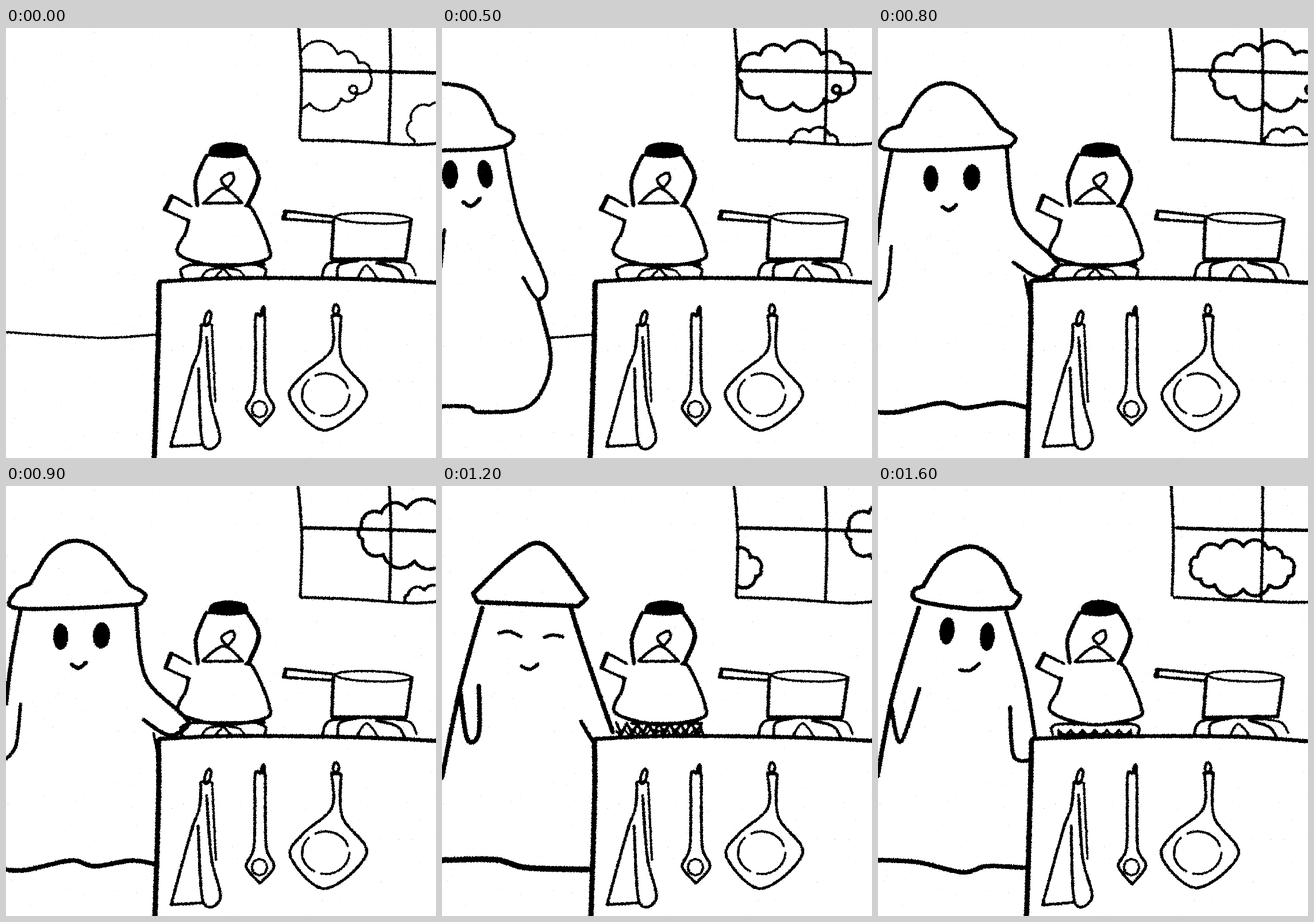
Animation, 748 px wide and 748 px high, one loop 1.7 s. Source, as an HTML page:

```html
<!DOCTYPE html>
<html lang="en">
<head>
<meta charset="utf-8">
<title>Kitchen ghost</title>
<style>
html, body { margin: 0; width: 100%; height: 100%; overflow: hidden; background: #fff; }
svg { display: block; width: 748px; height: 748px; overflow: hidden; }
#scene { stroke: #000; fill: none; stroke-linecap: round; stroke-linejoin: round; }
</style>
</head>
<body>
<svg viewBox="0 0 748 748">
  <defs>
    <filter id="crayon" filterUnits="userSpaceOnUse" x="-20" y="-20" width="788" height="788" color-interpolation-filters="sRGB">
      <feTurbulence type="fractalNoise" baseFrequency=".42" numOctaves="2" seed="4"/>
      <feColorMatrix values="0 0 0 1 0 0 0 0 1 0 0 0 0 1 0 0 0 0 0 1" result="grain"/>
      <feGaussianBlur in="SourceGraphic" stdDeviation="1.1"/>
      <feComposite in2="grain" operator="arithmetic" k2="1" k3="1.2" k4="-.6"/>
      <feComponentTransfer>
        <feFuncR type="linear" slope="5" intercept="-2"/>
        <feFuncG type="linear" slope="5" intercept="-2"/>
        <feFuncB type="linear" slope="5" intercept="-2"/>
      </feComponentTransfer>
    </filter>
    <clipPath id="pane"><rect x="511" y="0" width="237" height="204"/></clipPath>
  </defs>
  <g filter="url(#crayon)">
    <rect x="-40" y="-40" width="828" height="828" fill="#fff"/>
    <g id="scene"></g>
  </g>
</svg>
<script>
// Strokes are "kind+width:points"; "/" marks a sharp corner.
// f filled, w white inside, m mirrored about the first number,
// e solid ellipse, o open ellipse, d dashed ellipse (cx cy rx ry angle).
const floor = ['4:0 529 165 539 262 533'];

const frame = [
  '5:509 0 514 90 511 191',
  '5:668 0 669 95 666 197',
  '6:519 74 610 75 748 78',
  '5:514 195 600 197 700 203 748 201'
];
const kettle = [
  'f3:354 222 357 207 382 200 414 205 417 220 388 225 354 222',
  '7:349 222 330 265 333 308',
  '8:414 212 439 258 421 307',
  '5:383 277 374 263 392 252 396 264 387 276',
  '5:343 305 378 279 411 304/343 305',
  '5:322 310/288 291/275 316/318 335',
  '8:288 293 278 314',
  '6:318 335 313 355 300 393 370 414 450 404 457 380 430 318 417 309'
];
const pot = [
  '5:573 329/485 318/481 332/570 338',
  '6:487 321 484 331',
  'o4:639 331 66 9 2',
  '6:570 335 566 402/695 402/705 333',
  '5:600 404 560 410 549 434',
  '5:612 405 580 412 576 434',
  '4:612 434 627 413 646 435',
  '5:645 409 680 418 692 436',
  '4:650 406 700 410 713 431'
];
const counter = [
  '7:268 441 400 435 620 437 748 443',
  '9:266 445 265 540 258 748'
];
const towel = [
  'o5:351 505 5 13 15',
  '5:340 516 336 560 322 598 286 728/340 725',
  '5:335 592 342 722 372 716 356 645 349 538',
  '4:340 516 358 516/364 650'
];
const spoon = [
  'm5:442 0 501 8 501 8 560 10 630 24 662 0 692',
  'd4:441 663 13 14 0',
  'e:447 492 5 10 8'
];
const pan = [
  '5:567 500 566 560 515 605 494 645 555 700 627 640 584 576 583 500/567 500',
  'd4:556 638 41 37 0',
  'o5:574 490 5 9 0'
];
const kitchen = [frame, kettle, pot, counter, towel, spoon, pan].flat();

const ghosts = {
  none: [],
  enter: [
    '9:-90 74 0 74 42 100 50 138/77 172 72 184 55 183/-90 183',
    '7:60 188 76 310 92 440 72 456 48 412 25 345',
    'w9:79 462 95 540 124 630 98 658 45 645 -5 661 -90 670',
    'e:67 252 9 20 0',
    '5:62 306 75 308'
  ],
  look: [
    '7:-50 200 0 108 35 97 95 113 128 168/158 188 130 208 10 213 -70 208',
    '6:142 208 167 330 214 440 200 472 174 434',
    'w7:200 474 222 580 185 657 98 668 70 658 -70 661',
    '6:37 351 22 475 -5 498',
    'e:47 255 14 25 0',
    'e:108 254 13 25 -10',
    '7:70 303 84 310 99 297'
  ],
  reach: [
    '7:40 170 75 115 118 96 165 115 212 173/239 190 230 206/120 212 10 210 15 180 40 170',
    '7:23 217 8 300 -3 380',
    '7:224 210 240 330 300 395 313 415 280 434 236 408',
    '5:255 432 265 482',
    '6:23 380 16 450 -2 475',
    '8:-10 668 35 668 110 652 150 661 215 652 260 660',
    'e:92 262 13 23 0',
    'e:163 260 15 23 3',
    '7:112 311 124 317 136 308'
  ],
  smile: [
    '8:52 187 130 115 180 105 250 195/235 209/60 202/52 187',
    '8:68 212 30 350 -2 507',
    '8:62 348 62 430 42 440 30 360',
    '8:222 212 250 300 295 428',
    '7:240 410 264 450',
    '10:-8 651 90 650 145 664 253 667',
    '6:97 256 115 253 135 262',
    '6:176 263 190 259 208 262',
    '6:136 313 151 319 165 310'
  ],
  wait: [
    '8:77 175 115 124 165 107 212 135 233 180/248 192 236 211/160 214 70 200 62 183 77 175',
    '8:70 212 28 360 -2 505',
    '7:222 218 256 330 272 437',
    '7:71 353 40 446 21 378',
    '7:229 385 237 470 267 478',
    '8:-8 651 70 655 145 673 190 661 252 663'
  ]
};
const faces = {
  wait: ['e:121 257 16 26 3', 'e:190 263 15 25 3', '8:136 312 153 322 170 312'],
  rest: ['e:120 252 13 24 6', 'e:190 262 13 25 3', '6:142 320 160 321 176 309']
};

// ghost pose and sideways shift for each step
const poses = `none 0,enter -85,enter -43,enter 0,enter 33,look -33,look 0,look 35,
reach 0,reach 3,smile -8,smile 0,smile 2,wait 0,wait 0,wait 0,wait 0`.split(',').map(s => s.trim().split(' '));

// repeatable noise from -1 to 1
const noise = n => 2 * ((Math.abs(Math.sin(n * 12.9898)) * 43758.5453) % 1) - 1;

function curve(text, seed, flip) {
  let d = '', last, k = seed * 77;
  const wobble = () => seed ? noise(++k) * 1.3 : 0;
  for (const part of text.split('/')) {
    const n = part.split(' ').map(Number), p = last ? [last] : [];
    for (let i = 0; i < n.length; i += 2) {
      const x = n[i] + wobble(), y = n[i + 1] + wobble();
      p.push([flip === undefined ? x : flip + x, y]);
    }
    if (!last) d = 'M' + p[0];
    for (let i = 0; i < p.length - 1; i++) {
      const a = p[i - 1] || p[i], b = p[i], c = p[i + 1], e = p[i + 2] || c;
      d += 'C' + b.map((v, j) => v + (c[j] - a[j]) / 6) +
        ' ' + c.map((v, j) => v - (e[j] - b[j]) / 6) + ' ' + c;
    }
    last = p[p.length - 1];
  }
  return d;
}

const path = (w, d, fill = 'none') => `<path d="${d}" stroke-width="${w}" fill="${fill}"/>`;

function mark(line, seed) {
  const [, kind, w, text] = line.match(/^([a-z]?)(\d*):(.*)$/);
  if ('eod'.includes(kind) && kind) {
    const [x, y, rx, ry, turn] = text.split(' ');
    const look = kind === 'e' ? 'fill="#000" stroke="none"' :
      `stroke-width="${w}"` + (kind === 'd' ? ` stroke-dasharray="${rx * 1.7} ${rx * .3}"` : '');
    return `<ellipse cx="${x}" cy="${y}" rx="${rx}" ry="${ry}" ${look} transform="rotate(${turn} ${x} ${y})"/>`;
  }
  if (kind === 'm') {
    const cut = text.indexOf(' '), axis = +text.slice(0, cut);
    const d = curve(text.slice(cut + 1), seed, 0);
    return [1, -1].map(s => `<g transform="translate(${axis}) scale(${s} 1)">${path(w, d)}</g>`).join('');
  }
  const d = curve(text, seed);
  if (kind === 'w') return `<path d="${d}V480Z" fill="#fff" stroke="none"/>` + path(w, d);
  return path(w, d, kind === 'f' ? '#000' : 'none');
}

const draw = (lines, seed = 0) => lines.map(s => mark(s, seed)).join('');

// ring of bumps around an ellipse
function cloud(x, y, rx, ry, bumps, w) {
  let d = '', px, py;
  for (let i = 0; i <= bumps; i++) {
    const k = i % bumps, a = (k + .25 * noise(k + bumps)) / bumps * 2 * Math.PI;
    const r = 1 + .06 * noise(k + 30);
    const qx = x + rx * r * Math.cos(a), qy = y + ry * r * Math.sin(a);
    const size = Math.hypot(qx - px, qy - py) * .55;
    d += i ? `A${size} ${size} 0 0 1 ${qx} ${qy}` : `M${qx} ${qy}`;
    px = qx; py = qy;
  }
  return path(w, d);
}

function between(t, keys) {
  const i = Math.max(1, keys.findIndex(k => k[0] >= t));
  const [a, from] = keys[i - 1], [b, to] = keys[i];
  return from + (to - from) * (t - a) / (b - a);
}
const drift = [[0, 533], [3, 576], [6, 635], [8, 680], [11, 786], [14, 843], [16, 885]];

function sky(t) {
  const x = between(t, drift), w = t ? 6 : 4;
  let s = cloud(x, 85, 95, 46, 11, w) +
    `<circle cx="${x + 71}" cy="107" r="7" stroke-width="${w}"/>`;
  if (t < 5) s += cloud(740 + 14 * t, 172, 38, 36, 7, w);
  if (t > 4) s += cloud(667 + 22 * (t - 6), 200, 40, 18, 8, 5);
  if (t > 11) s += cloud(634 + 42 * (t - 16), 142, 84, 38, 12, 6);
  return `<g clip-path="url(#pane)">${s}</g>`;
}

function zigzag(w, top, low, teeth) {
  let d = '';
  for (let i = 0; i <= teeth * 2; i++) {
    d += (i ? 'L' : 'M') + (303 + 149 * i / teeth / 2) + ' ' + ((i % 2 ? low : top) + 2 * noise(i + top));
  }
  return path(w, d);
}

function burner(t) {
  if (t < 10) return draw(['5:320 412 450 411', 'm5:378 58 412 74 420 70 436', 'm4:378 2 417 28 422 38 435', 'm4:378 0 418 14 433']);
  if (t < 13) return zigzag(5, 413, 430, 8) + zigzag(3, 424, 435, 10) + draw(['5:330 413 447 413', '4:450 417 454 432']);
  let d = 'M314 433V424';
  for (let i = 1; i < 7; i++) d += `q10.5 16 21 0`;
  return path(4, d + 'V432H314') + draw(['m5:378 0 415 60 414 76 420 74 432']);
}

const pictures = poses.map(([pose, x], t) => {
  const room = t < 7 ? 0 : t < 15 ? 1 : 2;
  const face = faces[t > 14 ? 'rest' : pose] || [];
  const redo = t === 9 || t > 14 ? t : 0;
  return (room ? '' : draw(floor)) +
    `<g transform="translate(${x})">${draw(ghosts[pose], redo)}${draw(face)}</g>` +
    sky(t) + burner(t) + draw(kitchen, room);
});

const scene = document.getElementById('scene');
const start = performance.now();
let shown = -1;

function tick() {
  const t = Math.floor((performance.now() - start) % 1700 / 100);
  if (t !== shown) scene.innerHTML = pictures[shown = t];
  requestAnimationFrame(tick);
}
tick();
</script>
</body>
</html>
```
